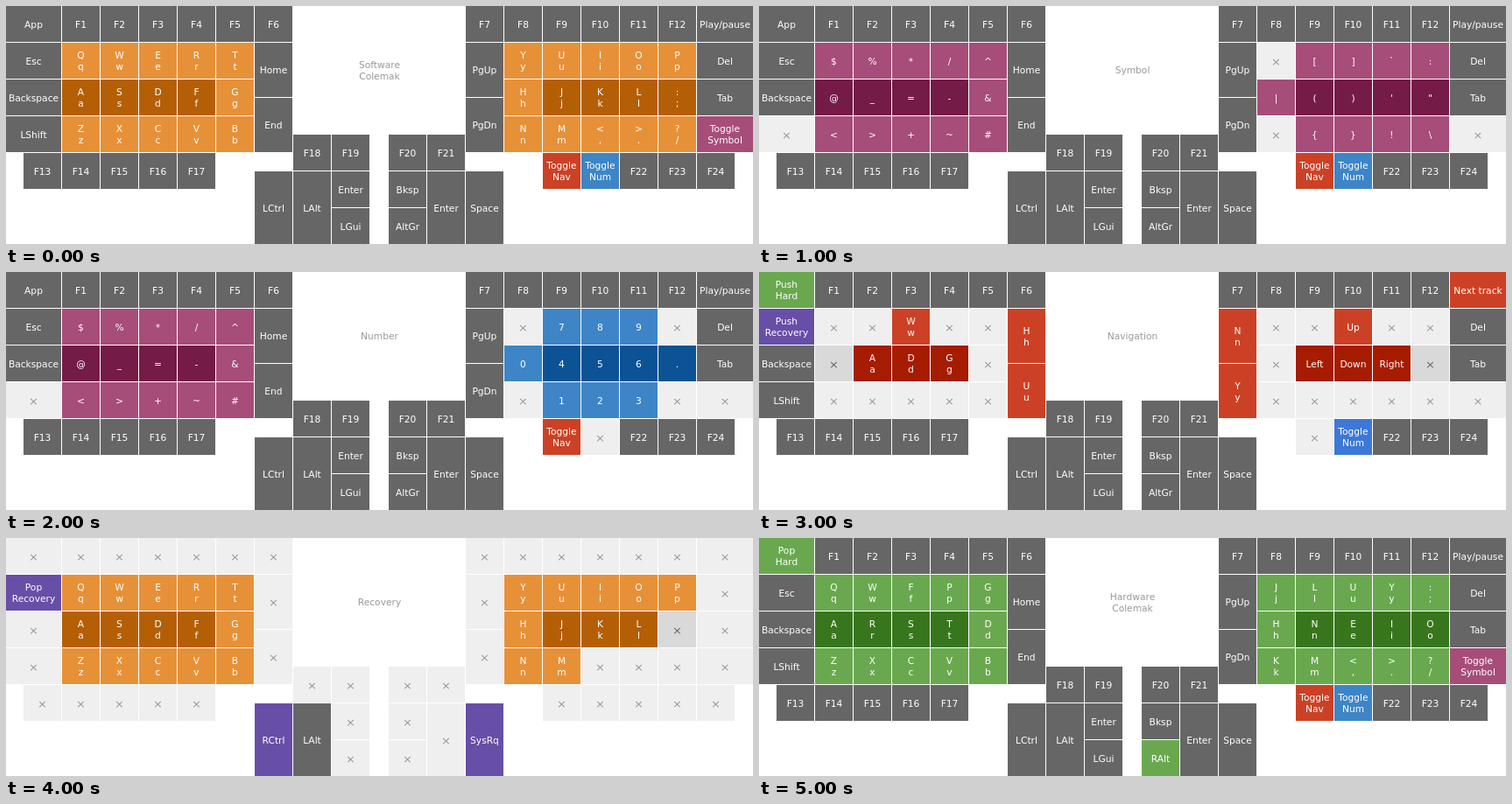
An HTML page that plays this animation: 853x272 px, repeating every 6 s.

```html
<!DOCTYPE html>
<html lang="en">
<head>
<meta charset="utf-8">
<title>Keyboard layers</title>
<style>
  html, body { margin: 0; width: 100%; height: 100%; overflow: hidden; background: #fff; }
  #stage { position: relative; width: 853px; height: 272px; overflow: hidden; }
  #strip { height: 1632px; animation: layers 6s steps(6) infinite; }
  @keyframes layers { to { transform: translateY(-1632px); } }
  .layer { position: relative; width: 853px; height: 272px; overflow: hidden; background: #fff; }
  .layer div {
    position: absolute; box-sizing: border-box; padding-top: 1.2px;
    display: flex; align-items: center; justify-content: center;
    font: 10.67px/13px "DejaVu Sans", sans-serif;
    color: #fff; white-space: pre; text-align: center;
  }
  .layer .none { font-size: 13px; }
</style>
</head>
<body>
<div id="stage"><div id="strip"></div></div>
<script>
const COLORS = {
  gray: '#666666', orange: '#e69138', magenta: '#a64d79', blue: '#3d85c6',
  cornflower: '#3c78d8', red: '#cc4125', green: '#6aa84f', purple: '#674ea7'
};
const HOME_COLORS = {
  orange: '#b45f06', magenta: '#741b47', blue: '#0b5394', red: '#a61c00', green: '#38761d'
};
const COLS = [0, 64, 108, 152, 196, 240, 284, 525, 569, 613, 657, 701, 745, 789];
const NONE = '×';

// Keys outside the two letter blocks, with their usual labels
const outerKeys = [];
function addRow(names, xs, y, h = 41) {
  names.split(' ').forEach((name, i) => {
    const x = xs[i];
    const w = y > 167 ? 43 : x === 0 ? 63 : x === 789 ? 64 : 43;
    outerKeys.push({ name, x, y, w, h });
  });
}
addRow('App F1 F2 F3 F4 F5 F6 F7 F8 F9 F10 F11 F12 Play/pause', COLS, 0);
addRow('Esc Del', [0, 789], 42);
addRow('Backspace Tab', [0, 789], 84);
addRow('LShift Symbol', [0, 789], 126);
addRow('Home PgUp', [284, 525], 42, 62);
addRow('End PgDn', [284, 525], 105, 62);
addRow('F13 F14 F15 F16 F17 Nav Num F22 F23 F24',
  [20, 64, 108, 152, 196, 613, 657, 701, 745, 789], 168);
addRow('F18 F19 F20 F21', [328, 372, 437, 481], 147);
addRow('LCtrl LAlt Enter Space', [284, 328, 481, 525], 189, 83);
addRow('Enter Bksp', [372, 437], 189);
addRow('LGui AltGr', [372, 437], 231);

const TOGGLES = {
  Symbol: 'magenta Toggle|Symbol', Nav: 'red Toggle|Nav', Num: 'blue Toggle|Num'
};

const QWERTY = 'Q W E R T A S D F G Z X C V B';
const SYMBOLS = '$ % * / ^ @ _ = - & < > + ~ #';

const layers = [
  {
    title: 'Software|Colemak',
    left: ['orange', QWERTY],
    right: ['orange', 'Y U I O P H J K L :; N M <, >. ?/']
  },
  {
    title: 'Symbol',
    left: ['magenta', SYMBOLS],
    right: ['magenta', '× [ ] ` : | ( ) \' " × { } ! \\'],
    keys: { LShift: NONE, Symbol: NONE }
  },
  {
    title: 'Number',
    left: ['magenta', SYMBOLS],
    right: ['blue', '× 7 8 9 × 0 4 5 6 . × 1 2 3 ×'],
    keys: { LShift: NONE, Symbol: NONE, Num: NONE }
  },
  {
    title: 'Navigation',
    left: ['red', '× × W × × × A D G × × × × × ×'],
    right: ['red', '× × Up × × × Left Down Right × × × × × ×'],
    keys: {
      App: 'green Push|Hard', Esc: 'purple Push|Recovery', 'Play/pause': 'red Next track',
      Home: 'red H', End: 'red U', PgUp: 'red N', PgDn: 'red Y',
      Symbol: NONE, Nav: NONE, Num: 'cornflower Toggle|Num'
    }
  },
  {
    title: 'Recovery',
    left: ['orange', QWERTY],
    right: ['orange', 'Y U I O P H J K L × N M × × ×'],
    keys: {
      Esc: 'purple Pop|Recovery', LCtrl: 'purple RCtrl',
      LAlt: 'gray LAlt', Space: 'purple SysRq'
    },
    othersOff: true
  },
  {
    title: 'Hardware|Colemak',
    left: ['green', 'Q W F P G A R S T D Z X C V B'],
    right: ['green', 'J L U Y :; H N E I O K M <, >. ?/'],
    keys: { App: 'green Pop|Hard', AltGr: 'green RAlt' }
  }
];

function caption(label) {
  if (/^[A-Z]$/.test(label)) return label + '\n' + label.toLowerCase();
  if (/^\W\W$/.test(label)) return label[0] + '\n' + label[1];
  return label.replace(/(\w)\|(\w)/, '$1\n$2');
}

function addBox(parent, x, y, w, h, label, background, color) {
  const box = document.createElement('div');
  box.style.cssText = `left:${x}px;top:${y}px;width:${w}px;height:${h}px`;
  if (background) box.style.background = background;
  if (color) box.style.color = color;
  box.textContent = caption(label);
  if (label === NONE) box.className = 'none';
  parent.append(box);
}

function addKey(parent, { x, y, w, h }, label, color, home = false) {
  if (label === NONE) {
    addBox(parent, x, y, w, h, label, home ? '#d9d9d9' : '#efefef', home ? '#666' : '#999');
  } else {
    addBox(parent, x, y, w, h, label, (home ? HOME_COLORS : COLORS)[color]);
  }
}

function addBlock(parent, [color, labels], firstCol, isHomeCol) {
  labels.split(' ').forEach((label, i) => {
    const col = i % 5, row = Math.floor(i / 5);
    const key = { x: COLS[firstCol + col], y: 42 * (row + 1), w: 43, h: 41 };
    addKey(parent, key, label, color, row === 1 && isHomeCol(col));
  });
}

for (const { title, left, right, keys = {}, othersOff } of layers) {
  const layer = document.createElement('div');
  layer.className = 'layer';
  layer.style.cssText = 'position:relative;display:block;padding:0';
  addBox(layer, 328, 0, 197, 146, title, null, '#999');
  addBlock(layer, left, 1, col => col < 4);
  addBlock(layer, right, 8, col => col > 0);
  for (const key of outerKeys) {
    const usual = othersOff ? NONE : TOGGLES[key.name] || 'gray ' + key.name;
    const [color, ...words] = (keys[key.name] || usual).split(' ');
    addKey(layer, key, words.join(' ') || NONE, color);
  }
  document.getElementById('strip').append(layer);
}
</script>
</body>
</html>
```
